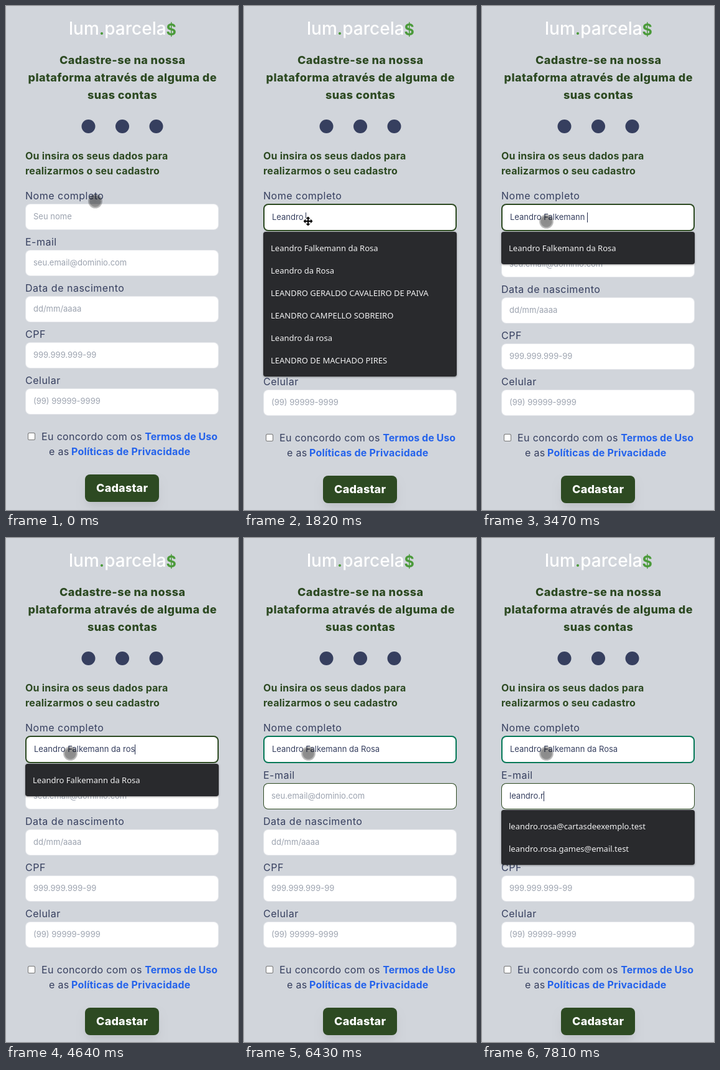
An HTML page with a canvas for the animation above (8 s loop, 373 by 808 pixels).

```html
<!DOCTYPE html>
<html lang="pt-BR">
<head>
<meta charset="utf-8">
<title>Cadastro</title>
<style>
  html, body { margin: 0; width: 100%; height: 100%; overflow: hidden; background: #d1d5db; }
  canvas { display: block; width: 373px; height: 808px; }
</style>
</head>
<body>
<canvas id="stage"></canvas>
<script>
const W = 373, H = 808, LOOP = 8000;
const GREEN = '#2d4a22', NAVY = '#363f5f', GRAY = '#9ca3af', BLUE = '#2563eb', LEAF = '#4b9a3a';
const SANS = 'Inter, "Open Sans", sans-serif';
const MENU_FONT = '400 13px "Noto Sans", "Open Sans", sans-serif';
const INPUT_FONT = '400 13px ' + SANS;
const LABEL_FONT = '400 16px ' + SANS;
const BOLD_FONT = '700 16px ' + SANS;
const TITLE_FONT = '800 18px ' + SANS;

const canvas = document.getElementById('stage');
const ctx = canvas.getContext('2d');
const dpr = window.devicePixelRatio || 1;
canvas.width = W * dpr;
canvas.height = H * dpr;

const people = [
  'Leandro Falkemann da Rosa',
  'VALDOMIRO ERNESTO DA PENHA BARRETO',
  'CAIO BRUNO TEVEIRA DA PENHA',
  'OSVALDO DA PENHA CAVALEIRO',
  'MARGARIDA DOS RIOS MOREIRA',
  'IVAN LEONIDIO PIRES'
];
const matches = [
  'Leandro Falkemann da Rosa',
  'Leandro da Rosa',
  'LEANDRO GERALDO CAVALEIRO DE PAIVA',
  'LEANDRO CAMPELLO SOBREIRO',
  'Leandro da rosa',
  'LEANDRO DE MACHADO PIRES'
];
const emails = [
  'leandro.rosa@cartasdeexemplo.test',
  'leandro.rosa.games@email.test',
  'leandro.falkemann@email.test',
  'leandrofalkemann@email.test'
];

// A keyboard log: each entry holds the time and the value after the key
function keyboard() {
  const log = [{ at: 0, value: '' }];
  const last = () => log[log.length - 1].value;
  return {
    type(start, step, str) {
      [...str].forEach((c, i) => log.push({ at: start + i * step, value: last() + c }));
      return this;
    },
    erase(start, step, count) {
      for (let i = 0; i < count; i++) log.push({ at: start + i * step, value: last().slice(0, -1) });
      return this;
    },
    at(t) {
      let value = '';
      for (const k of log) if (k.at <= t) value = k.value;
      return value;
    }
  };
}

const nameKeys = keyboard()
  .type(830, 125, 'Leandro ')
  .type(1990, 130, 'Falkeman')
  .type(3240, 132, 'n da ros')
  .type(4320, 0, 'a')
  .erase(4640, 126, 4)
  .type(5144, 126, 'Rosa');
const mailKeys = keyboard()
  .type(6810, 103, 'leandro')
  .type(7730, 80, '.r');

function text(str, x, y, font, color, spacing = 0, align = 'left') {
  ctx.font = font;
  ctx.letterSpacing = spacing + 'px';
  ctx.fillStyle = color;
  const width = ctx.measureText(str).width;
  if (align === 'center') x -= (width - spacing) / 2;
  if (align === 'right') x -= width - spacing;
  ctx.fillText(str, x, y);
  return x + width;
}

function box(x, y, w, h, r, fill) {
  ctx.beginPath();
  ctx.roundRect(x, y, w, h, r);
  ctx.fillStyle = fill;
  ctx.fill();
}

function shadowBox(x, y, w, h, r, fill, dy, blur, alpha) {
  ctx.save();
  ctx.shadowColor = `rgba(0,0,0,${alpha})`;
  ctx.shadowOffsetY = dy * dpr;
  ctx.shadowBlur = blur * dpr;
  box(x, y, w, h, r, fill);
  ctx.restore();
}

function dot(x, y, r, fill) {
  ctx.beginPath();
  ctx.arc(x, y, r, 0, Math.PI * 2);
  ctx.fillStyle = fill;
  ctx.fill();
}

function header() {
  const font = '500 28px ' + SANS;
  let x = text('lum', 101, 46, font, '#fff');
  x = text('.', x, 46, font, LEAF);
  x = text('parcela', x, 46, font, '#fff');
  text('$', x, 47, '700 25px ' + SANS, LEAF);

  ['Cadastre-se na nossa', 'plataforma através de alguma de', 'suas contas'].forEach((line, i) =>
    text(line, 187, 93 + i * 28, TITLE_FONT, GREEN, 0.4, 'center'));

  [132.5, 187, 241.5].forEach(cx => dot(cx, 193, 11, NAVY));

  text('Ou insira os seus dados para', 31, 246, BOLD_FONT, GREEN, 0.2);
  text('realizarmos o seu cadastro', 31, 270, BOLD_FONT, GREEN, 0.2);
}

function field(y, label, hint, opts = {}) {
  const { value = '', border = '#e5e7eb', line = 1, caret = false } = opts;
  const h = 40 + line * 2;
  text(label, 31, y - 7, LABEL_FONT, NAVY, 0.5);
  box(31, y, 311, h, 8, border);
  box(31 + line, y + line, 311 - line * 2, h - line * 2, 8 - line, '#fff');
  const x = 43 + line, base = y + 24 + line;
  text(value || hint, x, base, INPUT_FONT, value ? NAVY : GRAY);
  if (caret) {
    const w = value ? ctx.measureText(value).width : 0;
    ctx.fillStyle = '#26304f';
    ctx.fillRect(Math.round(x + w), y + 12 + line, 1, 16);
  }
}

function footer(dy) {
  box(35, 684 + dy, 12, 12, 2.5, '#767676');
  box(36, 685 + dy, 10, 10, 1.5, '#fff');
  text('Eu concordo com os', 57, 696 + dy, LABEL_FONT, NAVY, 0.35);
  text('Termos de Uso', 340, 696 + dy, BOLD_FONT, BLUE, 0, 'right');
  text('e as', 69, 720 + dy, LABEL_FONT, NAVY, 0.35);
  text('Políticas de Privacidade', 105, 720 + dy, BOLD_FONT, BLUE, 0.2);
  shadowBox(130, 754 + dy, 113, 38, 6, GREEN, 10, 15, 0.1);
  box(127, 751 + dy, 119, 44, 8, GREEN);
  text('Cadastar', 186.5, 779 + dy, TITLE_FONT, '#fff', 0.2, 'center');
}

function menu(y, items) {
  shadowBox(31, y, 311, items.length * 36 + 16, 4, '#292a2d', 1, 3, 0.4);
  items.forEach((item, i) => text(item, 43, y + 31 + i * 36, MENU_FONT, '#f1f1f2'));
}

function touch(x, y) {
  const g = ctx.createRadialGradient(x, y, 0, x, y, 12);
  g.addColorStop(0, 'rgba(0,0,0,.46)');
  g.addColorStop(0.7, 'rgba(0,0,0,.44)');
  g.addColorStop(0.82, 'rgba(0,0,0,.28)');
  g.addColorStop(1, 'rgba(0,0,0,.2)');
  dot(x, y, 11.5, g);
}

function moveArrows(x, y) {
  ctx.save();
  ctx.translate(x, y);
  ctx.beginPath();
  for (let i = 0; i < 4; i++) {
    ctx.moveTo(-1, 0);
    for (const [px, py] of [[-1, -4], [-3.5, -4], [0, -7.5], [3.5, -4], [1, -4], [1, 0]]) ctx.lineTo(px, py);
    ctx.closePath();
    ctx.rotate(Math.PI / 2);
  }
  ctx.lineJoin = 'round';
  ctx.lineWidth = 1.5;
  ctx.strokeStyle = '#fff';
  ctx.stroke();
  ctx.fillStyle = '#000';
  ctx.fill();
  ctx.restore();
}

function pointer(t) {
  if ((t >= 1820 && t < 1990) || (t >= 3500 && t < 3770)) return moveArrows(103, 345);
  const p = Math.min(1, Math.max(0, (t - 70) / 330));
  const e = p * p * (3 - 2 * p);
  touch(143.5 - 40 * e, 313 + 32.5 * e);
}

function draw(t) {
  ctx.setTransform(dpr, 0, 0, dpr, 0, 0);
  ctx.fillStyle = '#d1d5db';
  ctx.fillRect(0, 0, W, H);

  const name = nameKeys.at(t), mail = mailKeys.at(t);
  const onName = t >= 445 && t < 5900, onMail = t >= 5900;
  const dy = t >= 830 ? 2 : 0;

  header();
  field(317, 'Nome completo', 'Seu nome', {
    value: name,
    line: dy ? 2 : 1,
    border: onMail ? '#047857' : onName ? GREEN : '#e5e7eb',
    caret: onName
  });
  field(391 + dy, 'E-mail', 'seu.email@dominio.com', {
    value: mail,
    border: onMail ? GREEN : '#e5e7eb',
    caret: onMail && (t < 6430 || t >= 6810)
  });
  field(465 + dy, 'Data de nascimento', 'dd/mm/aaaa');
  field(539 + dy, 'CPF', '999.999.999-99');
  field(613 + dy, 'Celular', '(99) 99999-9999');
  footer(dy);

  if (t >= 520 && t < 830) menu(360, people);
  else if (t >= 830 && t < 1990) menu(362, matches);
  else if (t >= 1990 && t < 5650) menu(362, matches.slice(0, 1));
  else if (t >= 6810) menu(436, t < 7810 ? emails : emails.slice(0, 2));

  pointer(t);
}

const began = performance.now();
function tick() {
  draw((performance.now() - began) % LOOP);
  requestAnimationFrame(tick);
}
tick();
</script>
</body>
</html>
```
